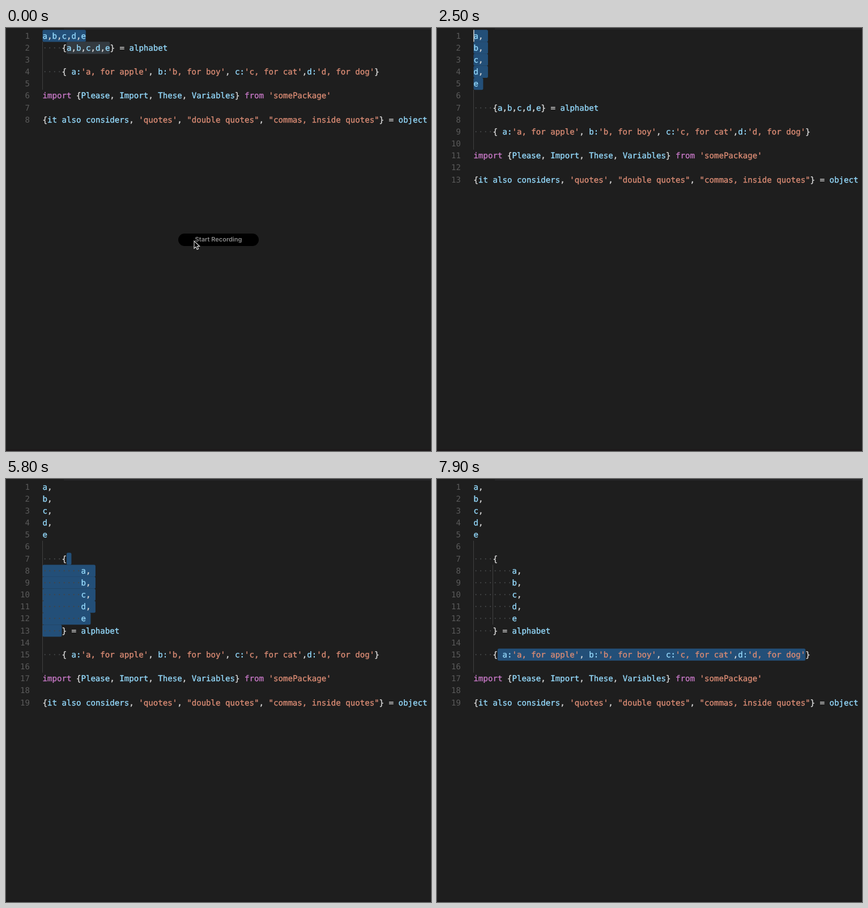
An HTML page for the animation above (8 s loop, 750 by 747 pixels).

```html
<!DOCTYPE html>
<html lang="en">
<head>
<meta charset="utf-8">
<title>Splitting lists in an editor</title>
<style>
  html, body { margin: 0; width: 100%; height: 100%; overflow: hidden; background: #1e1e1e; }
  svg { display: block; width: 100vw; height: 100vh; }
  text { white-space: pre; text-rendering: geometricPrecision; }
  .code { font: 14.1px "DejaVu Sans Mono", monospace; stroke-width: .35px; }
  .num { font: 14.1px "DejaVu Sans Mono", monospace; fill: #5a5a5a; text-anchor: end; }
  .name { fill: #94d9fb; stroke: #94d9fb; }
  .string { fill: #d98b74; stroke: #d98b74; }
  .keyword { fill: #c678c5; stroke: #c678c5; }
  .mark { fill: #d8d8d8; stroke: #d8d8d8; }
  .space { fill: #434547; stroke: none; }
  .button { font: 600 11px Inter, "Liberation Sans", sans-serif; fill: #8c8c8c; text-anchor: middle; }
</style>
</head>
<body>
<svg viewBox="0 0 750 747">
  <rect width="750" height="747" fill="#1e1e1e"/>
  <rect x="102" width="648" height="3" fill="#252526"/>
  <rect y="744" width="750" height="3" fill="#1d181a"/>
  <g id="editor"></g>
  <rect id="caret" width="1.6" height="21.2" fill="#c8c8c8"/>
  <g id="record">
    <rect x="304" y="363" width="142" height="22" rx="11" fill="#000"/>
    <text class="button" x="375" y="377.4">Start Recording</text>
  </g>
  <path id="arrow" d="M0 0V13.2L3.1 10.4L5.2 15L7.6 13.9L5.6 9.5H9.6Z" fill="#000" stroke="#e8e8e8" stroke-width="1.1"/>
  <g id="beam" fill="none" stroke-linecap="round">
    <path d="M-3 -6.5Q0 -6.5 0 -4.5Q0 -6.5 3 -6.5M0 -4.5V4.5M-3 6.5Q0 6.5 0 4.5Q0 6.5 3 6.5M-1.5 2.5H1.5" stroke="#d8d8d8" stroke-width="1.1"/>
  </g>
</svg>
<script>
const LOOP = 8000, TICK = 100, BLINK = 500;
const LEFT = 64.5, TOP = 3.2, CHAR = 8.49, ROW = 21.17;
const $ = id => document.getElementById(id);
const colX = col => LEFT + col * CHAR;
const rowY = line => TOP + (line - 1) * ROW;

const letters = [...'abcde'];
const items = indent => letters.map((c, i) => indent + c + (i < 4 ? ',' : ''));
const inline = '    {a,b,c,d,e} = alphabet';
const tail = [
  '',
  "    { a:'a, for apple', b:'b, for boy', c:'c, for cat',d:'d, for dog'}",
  '',
  "import {Please, Import, These, Variables} from 'somePackage'",
  '',
  `{it also considers, 'quotes', "double quotes", "commas, inside quotes"} = object`
];
// guides: [column, first line, last line]
const flat = { lines: ['a,b,c,d,e', inline, ...tail], guides: [[0, 2, 5]] };
const listed = { lines: [...items(''), '', inline, ...tail], guides: [[0, 6, 10]] };
const nested = {
  lines: [...items(''), '', '    {', ...items(' '.repeat(8)), '    } = alphabet', ...tail],
  guides: [[0, 6, 16], [4, 8, 12]]
};

// Each step: time, document, caret [line, col], optional selection anchor
const steps = [
  [-600, flat, [1, 9], [1, 0]],
  [200, flat, [1, 7]],
  [1500, flat, [1, 6], [1, 9]],
  [1600, flat, [1, 3], [1, 9]],
  [1700, flat, [1, 1], [1, 9]],
  [1900, flat, [1, 0], [1, 9]],
  [2300, listed, [1, 0], [6, 0]],
  [2900, listed, [6, 0]],
  [3100, listed, [7, 0]],
  ...[1, 2, 3, 4, 5].map(c => [3200 + c * 100, listed, [7, c]]),
  ...letters.concat(letters.slice(1)).map((_, i) => [4000 + i * 100, listed, [7, 6 + i], [7, 5]]),
  [5100, nested, [13, 4], [7, 5]],
  [6200, nested, [13, 4]],
  [6300, nested, [14, 0]],
  [6400, nested, [15, 4]],
  [6500, nested, [15, 5]],
  [6600, nested, [15, 70], [15, 5]],
  [6700, nested, [15, 69], [15, 5]],
  [7150, nested, [15, 69], [15, 5]]
];

// Pointer: time, x, y
const pointer = [
  [0, 332, 376], [100, 240, 190], [200, 126, 13], [600, 126, 13], [1100, 159, 13],
  [1400, 159, 13], [1500, 116, 13], [1600, 90, 13], [1700, 76, 13], [1900, 66, 13], [2100, 66, 13]
];

const block = (line, from, to, attrs) =>
  `<rect x="${colX(from)}" y="${rowY(line)}" width="${(to - from) * CHAR}" height="${ROW + .1}" ${attrs}/>`;

function paint(line) {
  const indent = line.match(/^ */)[0].length;
  const dots = `<tspan class="space">${'·'.repeat(indent)}</tspan>`;
  const body = line.slice(indent).replace(/('[^']*'|"[^"]*")|(\bimport\b|\bfrom\b)|(\w+:?)|([^\w'"]+)/g,
    (token, string, keyword, name) => {
      const kind = string ? 'string' : keyword ? 'keyword' : name ? 'name' : 'mark';
      return `<tspan class="${kind}">${token}</tspan>`;
    });
  return dots + body;
}

function selection(lines, a, b) {
  const [start, end] = [a, b].sort((p, q) => p[0] - q[0] || p[1] - q[1]);
  let out = '';
  for (let n = start[0]; n <= end[0]; n++) {
    const from = n === start[0] ? start[1] : 0;
    const to = n === end[0] ? end[1] : lines[n - 1].length + 1;
    if (to > from) out += block(n, from, to, 'fill="#234f78" rx="2.5"');
  }
  if (lines === flat.lines) out += block(2, start[1] + 5, end[1] + 5, 'fill="#343b41" rx="2.5"');
  return out;
}

function bracePair(lines, [line, col]) {
  const braces = lines.flatMap((text, i) =>
    [...text.matchAll(/[{}]/g)].map(m => [i + 1, m.index]));
  let hit = braces.findIndex(b => b[0] === line && b[1] === col);
  if (hit < 0) hit = braces.findIndex(b => b[0] === line && b[1] === col - 1);
  if (hit < 0) return '';
  return [braces[hit], braces[hit ^ 1]].map(([n, c]) =>
    `<rect x="${colX(c) + .5}" y="${rowY(n) + .5}" width="${CHAR - .5}" height="${ROW - 1}" fill="#1b251b" stroke="#858585"/>`).join('');
}

function drawEditor([, doc, caret, anchor]) {
  const { lines, guides } = doc;
  let out = '';
  if (!anchor) out += `<rect x="65" y="${rowY(caret[0]) + 1}" width="690" height="${ROW - 2}" fill="none" stroke="#292929" stroke-width="2"/>`;
  out += guides.map(([col, first, last]) =>
    `<rect x="${Math.floor(colX(col))}" y="${rowY(first)}" width="1" height="${(last - first + 1) * ROW}" fill="#404040"/>`).join('');
  out += anchor ? selection(lines, anchor, caret) : bracePair(lines, caret);
  lines.forEach((line, i) => {
    const y = rowY(i + 1) + 15.3;
    out += `<text class="num" x="42" y="${y}">${i + 1}</text>`;
    if (line) out += `<text class="code" x="${LEFT}" y="${y}">${paint(line)}</text>`;
  });
  $('editor').innerHTML = out;
  $('caret').setAttribute('x', colX(caret[1]) - .3);
  $('caret').setAttribute('y', rowY(caret[0]));
}

function pointerAt(t) {
  const i = Math.max(1, pointer.findIndex(p => p[0] > t));
  const [a, b] = [pointer[i - 1], pointer[i]];
  const k = (t - a[0]) / (b[0] - a[0]);
  return [1, 2].map(j => a[j] + (b[j] - a[j]) * k);
}

const show = (id, on) => $(id).setAttribute('opacity', +on);
let drawn;

function frame() {
  const now = performance.now() % LOOP;
  const t = Math.floor(now / TICK) * TICK;
  const step = steps.findLast(s => s[0] <= t);
  if (step !== drawn) drawEditor(drawn = step);
  show('caret', Math.floor((t - step[0]) / BLINK) % 2 === 0);
  show('record', Math.max(0, 1 - t / 200));
  show('arrow', t < 100);
  show('beam', t >= 100 && t < 2100);
  if (t < 2100) {
    const place = `translate(${pointerAt(t)})`;
    $('arrow').setAttribute('transform', place);
    $('beam').setAttribute('transform', place);
  }
  requestAnimationFrame(frame);
}
frame();
</script>
</body>
</html>
```
